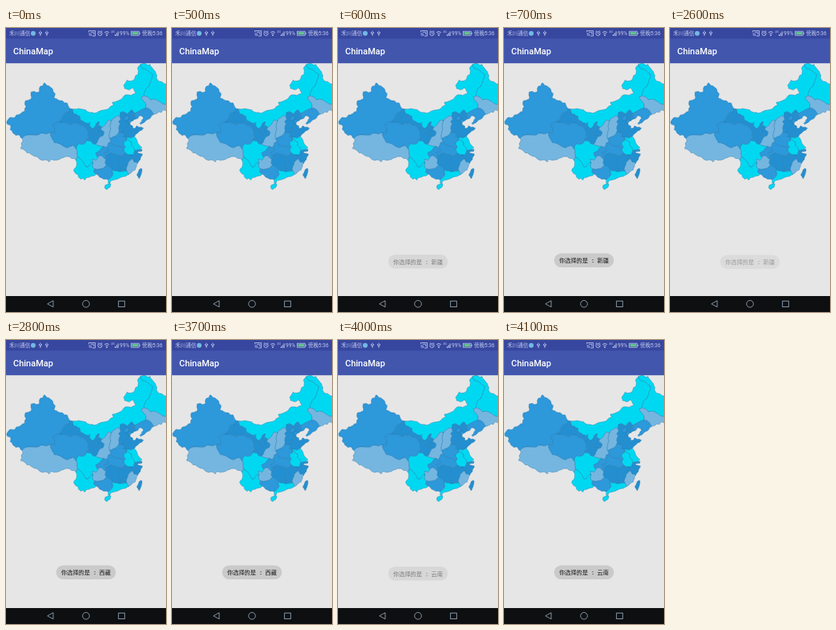
Recreate the animation shown at these times as an HTML page. Size 200 px wide and 356 px high, loop 4.4 s.

```html
<!DOCTYPE html>
<html lang="zh">
<head>
<meta charset="utf-8">
<title>ChinaMap</title>
<style>
html, body { margin: 0; width: 100%; height: 100%; overflow: hidden; background: #e6e6e6; }
svg { display: block; width: 100%; height: 100%; }
text { font-family: Roboto, "Noto Sans CJK SC", "Noto Sans CJK", sans-serif; }
#map { stroke: #1f75a8; stroke-width: .4; stroke-linejoin: round; }
.a { fill: #2d98da; }
.b { fill: #75b6e1; }
.c { fill: #00d8f1; }
.d { fill: #238fd0; }
#status { fill: #c3caea; font-size: 6.6px; }
.line { fill: none; stroke: #c3caea; stroke-width: .8; }
#nav { fill: none; stroke: #9db4cb; stroke-width: .8; }
#toast text { font-size: 7.2px; fill: #161616; }
</style>
</head>
<body>
<svg viewBox="0 0 200 356" preserveAspectRatio="none">
  <rect width="200" height="356" fill="#e6e6e6"/>

  <g id="map">
    <polygon class="a" points="1,117 5,112 10,112.5 13,109 17,108 20,105.5 23.5,104.5 24,100 25.5,98.5 23.5,95.5 24.5,91 28,90.5 31.5,89 31,84 31.5,80 34,79.5 38,81 42,79.5 41.5,76 43,73 46,72.5 47,69.5 48.5,69 51,72 55,73.5 58,76 59,79.5 61.5,82 61,85 60.3,88 65,90 70,91 73.5,94 76.5,94 78,98 80.3,101 78.5,106 75,106.5 71.5,109.5 70.5,114 66.6,118 62,118.5 58.5,121.5 61,125.5 60.6,131.6 56,131 50,133 43.8,132 38,134.5 31.5,134 24,135 20.3,138.5 18,137 16,134 12,134.5 9,132 8,129.5 5,127 6,124 5,121.5 1.5,120.5"/>
    <polygon class="b" points="20.3,138.5 24,135 31.5,134 38,134.5 43.8,132 50,133 56,131 56.5,136.4 60.6,143.7 65,144.5 70,147 77,150 80,148 83.8,147 88,152 89,155 89.4,161 87.6,166 85,163.5 82.4,163.5 79,161 75,161 70,163 66.6,165 63.8,165.5 60,166 56,165 54,168 50.8,165.5 46,166 41.4,164 38,161 33.3,159.5 30,157 26.3,156.5 23,153 18.2,151 20,148 19,145 21,142"/>
    <polygon class="a" points="61,125.5 58.5,121.5 62,118.5 66.6,118 74,118.5 80.6,121.5 83.4,119.3 89.4,119 94,122 100,124 103.4,131 102.3,134.2 104,137 100.5,139.9 101,141 99.5,144 96,145.7 91,145 88,149 88,152 83.8,147 80,148 77,150 70,147 65,144.5 60.6,143.7 56.5,136.4 56,131 60.6,131.6"/>
    <polygon class="d" points="80.3,101 83,101.6 84.5,107 88,108 92.5,110.5 94,116 99.2,118.8 102,119.5 105,118 105,123 107.6,126 110.4,128.6 111.5,132 115,135 116.7,132 116,128.6 118.5,127.3 123,131 121.3,135 117,136.4 115.3,139.9 114.6,142.8 112.2,145.7 108.3,145 105.2,141.5 101,141 100.5,139.9 104,137 102.3,134.2 103.4,131 100,124 94,122 89.4,119 83.4,119.3 80.6,121.5 74,118.5 66.6,118 70.5,114 71.5,109.5 75,106.5 78.5,106"/>
    <polygon class="c" points="83,101.6 91,101 99.2,102.5 105,106 110.4,106.8 116,104.5 121,103 128,101.5 131,98 134.6,96.7 133,93 138,92 142,90.3 146,87 149.7,83.7 156,84.5 162.3,81.7 160,77.5 157.7,75 153,77.5 148.3,76 147,72 151.4,65.3 156,66.5 160.5,64.2 162,59.5 165,57.5 165.4,53 164.5,50 168.2,45.4 170,50.5 177,53 184,58.5 182.5,63 181.2,67 178.7,73.3 175,76 173.5,80 172.4,85.3 169.3,86.3 171,90.3 175,96 175,100.5 167.5,103.5 161,107 158,103 155,104 152,108 147,105 143,106 142.3,110.5 139,110 134,113 132,117 127.5,115.5 124,121 119.5,125 118,123 115.5,122.5 116.5,117.5 113.5,119 110.5,125 107.6,126 105,123 105,118 102,119.5 99.2,118.8 94,116 92.5,110.5 88,108 84.5,107"/>
    <polygon class="c" points="168.2,45.4 173,44.3 177,46.5 180,45.5 182.5,49.5 184.5,52 187,55 188.5,59 188,62.5 190,66 194,67 198,70 203,71 203,94 198,95.7 192.8,92.8 187,89.5 180.5,90 176,86 172.4,85.3 173.5,80 175,76 178.7,73.3 181.2,67 182.5,63 184,58.5 177,53 170,50.5"/>
    <polygon class="b" points="172.4,85.3 176,86 180.5,90 187,89.5 192.8,92.8 198,95.7 203,94 203,102 200,103.5 197,102.5 194.5,105.5 191,105 187.5,107.5 184,108.5 182.5,105 180,102 175,100.5 175,96 171,90.3 169.3,86.3"/>
    <polygon class="a" points="175,100.5 180,102 182.5,105 184,108.5 181.5,111 179,114 175,116 172,119 168.5,121 167.2,119.5 169.5,117 172,113 170,110.5 166,110.5 165,113 162.5,114 160.5,110 161,107 167.5,103.5"/>
    <polygon class="d" points="107.6,126 110.5,125 113.5,119 116.5,117.5 115.5,122.5 118,123 119.5,125 118.5,127.3 116,128.6 116.7,132 115,135 111.5,132 110.4,128.6"/>
    <polygon class="b" points="118.5,127.3 119.5,125 124,121 127.5,115.5 132,117 130.5,121 131,126 129.5,132 129.5,138.5 131,143.5 128,144 126.5,148 125.7,150 122,148.3 116,147.5 112.2,145.7 114.6,142.8 115.3,139.9 117,136.4 121.3,135 123,131"/>
    <polygon class="b" points="132,117 134,113 139,110 142.3,110.5 143.5,114.5 141,118 143,120 141,126 141,131 137.5,135 133,137 129.5,138.5 129.5,132 131,126 130.5,121"/>
    <polygon class="d" points="142.3,110.5 143,106 147,105 152,108 155,104 158,103 161,107 160.5,110 162.5,114 158.5,116.5 155,118 155,121 150.5,125.5 147.5,128 146.5,132 141,131 141,126 143,120 141,118 143.5,114.5"/>
    <polygon class="a" points="147,114 150,110 153.5,111 153,115 149,116.5"/>
    <polygon class="a" points="153,115 155.5,114 156.5,117.3 155,118 155,120 153,120"/>
    <polygon class="d" points="150.5,125.5 155,121 158.5,123 159,126 161.5,125.5 163,122.8 165.5,124 169,124 172,125.5 170,128 166.5,129.5 164,132 160.5,136 156,138 150,137.5 146,136 149,133 146.5,132 147.5,128"/>
    <polygon class="a" points="146.5,132 149,133 146,136 150,137.5 151,141 147,144 149.5,149 147,151.5 143,149 137,148 133.2,145.7 131,143.5 129.5,138.5 133,137 137.5,135 141,131"/>
    <polygon class="c" points="150,137.5 153,140 157,143 157,147 160,150 161,154 160,158 156,159 150.5,158 148,155.5 147,151.5 149.5,149 147,144 151,141"/>
    <polygon class="c" points="150,137.5 156,138 160.5,136 164,141.5 165,144.5 167,147 170,150 166.5,152.5 161,154 160,150 157,147 157,143 153,140"/>
    <polygon class="d" points="166.5,152.5 170,152 169.5,154.5 166,154.5"/>
    <polygon class="d" points="161,154 166.5,152.5 166,154.5 164,156.5 170.5,158 168.5,162 168,165 166,167 164.5,169.5 160,168 157.5,164 156,159 160,158"/>
    <polygon class="a" points="128,144 131,143.5 133.2,145.7 137,148 143,149 147,151.5 148,155.5 150.5,158 148.5,158 143,161 139,158.5 132,157 127,158.5 125,160 123,156 128.5,153.5 125.7,150 126.5,148"/>
    <polygon class="a" points="122,148.3 125.7,150 128.5,153.5 123,156 125,160 125,164.5 121.5,162 118,160 115,162 113.5,161 112,156.5 117,154 119,150.5"/>
    <polygon class="c" points="88,149 91,145 96,145.7 99.5,144 101,141 105.2,141.5 108.3,145 112.2,145.7 116,147.5 122,148.3 119,150.5 117,154 112,156.5 113.5,161 115,162 112.2,166 108,164.5 109,169 106.5,169 103,174 99.5,174.5 97,168.5 94,165 91,163 89.4,161 89,155 88,152"/>
    <polygon class="c" points="87.6,166 89.4,161 91,163 94,165 97,168.5 99.5,174.5 103,174 106.5,169 109,169 108,173 110.5,176.5 110,181 113,183 111,185 106,186 100.5,187.5 98.5,190.5 96,188 93.5,189.5 91,187.5 90,184 87,182.5 84.5,178.5 88,174 88.5,170"/>
    <polygon class="b" points="109,169 108,164.5 112.2,166 115,162 118,160 121.5,162 125,164.5 124,169 126,172 122,176 117,177 110.5,176.5 108,173"/>
    <polygon class="d" points="125,160 127,158.5 132,157 139,158.5 143,161 141.5,167 142.5,174 143,180 138,179 133,178 130.5,174 126,172 124,169 125,164.5"/>
    <polygon class="d" points="143,161 148.5,158 150.5,158 156,159 157.5,164 153,168 151,174 151,179 147.5,179.5 143,180 142.5,174 141.5,167"/>
    <polygon class="b" points="157.5,164 160,168 164.5,169.5 163,174 161.5,178 158,180 156,182 153.5,183.5 151,179 151,174 153,168"/>
    <polygon class="a" points="110.5,176.5 117,177 122,176 126,172 130.5,174 133,178 134,183 130.5,188 127.5,190 122,189.5 117,187 113,183 110,181"/>
    <polygon class="c" points="133,178 138,179 143,180 147.5,179.5 151,179 153.5,183.5 149,186 143,187.5 137,190 132,191 130,194.5 127.5,194 127.5,190 130.5,188 134,183"/>
    <polygon class="c" points="124,197 128,195.2 131,195.5 129.5,200 126,202.5 123.5,200.5"/>
    <polygon class="d" points="166.5,177.5 169.5,176 170,179 167.5,187 166.5,189 163.5,184"/>
  </g>

  <rect width="200" height="14" fill="#3747a0"/>
  <rect y="13.3" width="200" height="30.9" fill="#4256ae"/>
  <text x="9" y="33" font-size="11" font-weight="500" fill="#fff">ChinaMap</text>

  <g id="status">
    <text x="4" y="9.2">禾川通信</text>
    <circle cx="34" cy="6.7" r="3" fill="#72b8e4"/>
    <path class="line" d="M43 3.5v6.5M41.5 5v1.6l1.5 1.3 1.5-1.3V5M51 3.5v6.5M49.5 5v1.6l1.5 1.3 1.5-1.3V5"/>
    <path class="line" d="M103.5 5V3.5h8v6.5h-3.5M103.5 6.5q3.5 0 3.5 3.5M103.5 8.3q1.7 0 1.7 1.7M106 5.3h3.8v3"/>
    <circle class="line" cx="117.5" cy="7" r="2.6"/>
    <path class="line" d="M117.5 5.5V7l1.2.8M114.6 4.6l1.4-1.3M120.4 4.6L119 3.3"/>
    <path class="line" d="M123 5.6q3-2.6 6 0M124.2 7.2q1.8-1.5 3.6 0"/>
    <circle cx="126" cy="9" r=".9"/>
    <text x="131.5" y="6.2" font-size="3.6">4G</text>
    <path d="M136 10V8h1v2zM137.8 10V6.2h1V10zM139.6 10V4.2h1V10z"/>
    <text x="142" y="9.2" font-size="6.5">99%</text>
    <rect class="line" x="156.6" y="4.2" width="9.6" height="5"/>
    <rect x="157.5" y="5.1" width="7.8" height="3.2" fill="#63c48d"/>
    <rect x="166.7" y="5.7" width="1" height="2"/>
    <text x="170" y="9.2" font-size="6.5">傍晚5:36</text>
  </g>

  <g id="toast" opacity="0">
    <rect x="62.7" y="282.5" width="74.6" height="17.6" rx="8.8" fill="#cacaca"/>
    <text y="294.2"><tspan x="69">你选择的是</tspan><tspan x="110" font-weight="700">:</tspan><tspan x="116.5" id="name"></tspan></text>
  </g>

  <rect y="336" width="200" height="20" fill="#0e0f10"/>
  <g id="nav">
    <path d="M59 341.8v8l-7.2-4z"/>
    <circle cx="100" cy="345.8" r="4.3"/>
    <rect x="140.7" y="342.2" width="7.6" height="7.4"/>
  </g>
</svg>
<script>
const LOOP = 4400;
// start ms, toast opacity, province
const steps = [
  [0, 0, ''],
  [600, .5, '新疆'],
  [700, 1, '新疆'],
  [2600, .36, '新疆'],
  [2700, .5, '西藏'],
  [2800, 1, '西藏'],
  [4000, .5, '云南'],
  [4100, 1, '云南']
];
const toast = document.getElementById('toast');
const label = document.getElementById('name');
const start = performance.now();

// Bend an edge at its middle; both neighbours of a border get the same bend.
function bend([ax, ay], [bx, by]) {
  const mx = (ax + bx) / 2, my = (ay + by) / 2;
  const size = Math.min(.6, Math.hypot(bx - ax, by - ay) * .12);
  const turn = mx * 37.1 + my * 91.7;
  return [mx + size * Math.cos(turn), my + size * Math.sin(turn)];
}

for (const shape of document.querySelectorAll('#map polygon')) {
  const pts = shape.getAttribute('points').split(' ').map(p => p.split(',').map(Number));
  const rough = pts.flatMap((p, i) => [p, bend(p, pts[(i + 1) % pts.length])]);
  shape.setAttribute('points', rough.join(' '));
}

function draw(now) {
  const t = Math.max(0, now - start) % LOOP;
  const [, alpha, name] = steps.findLast(s => s[0] <= t);
  toast.setAttribute('opacity', alpha);
  toast.setAttribute('transform', `translate(0 ${3 * (1 - alpha)})`);
  if (label.textContent !== name) label.textContent = name;
  requestAnimationFrame(draw);
}
draw(start);
</script>
</body>
</html>
```
